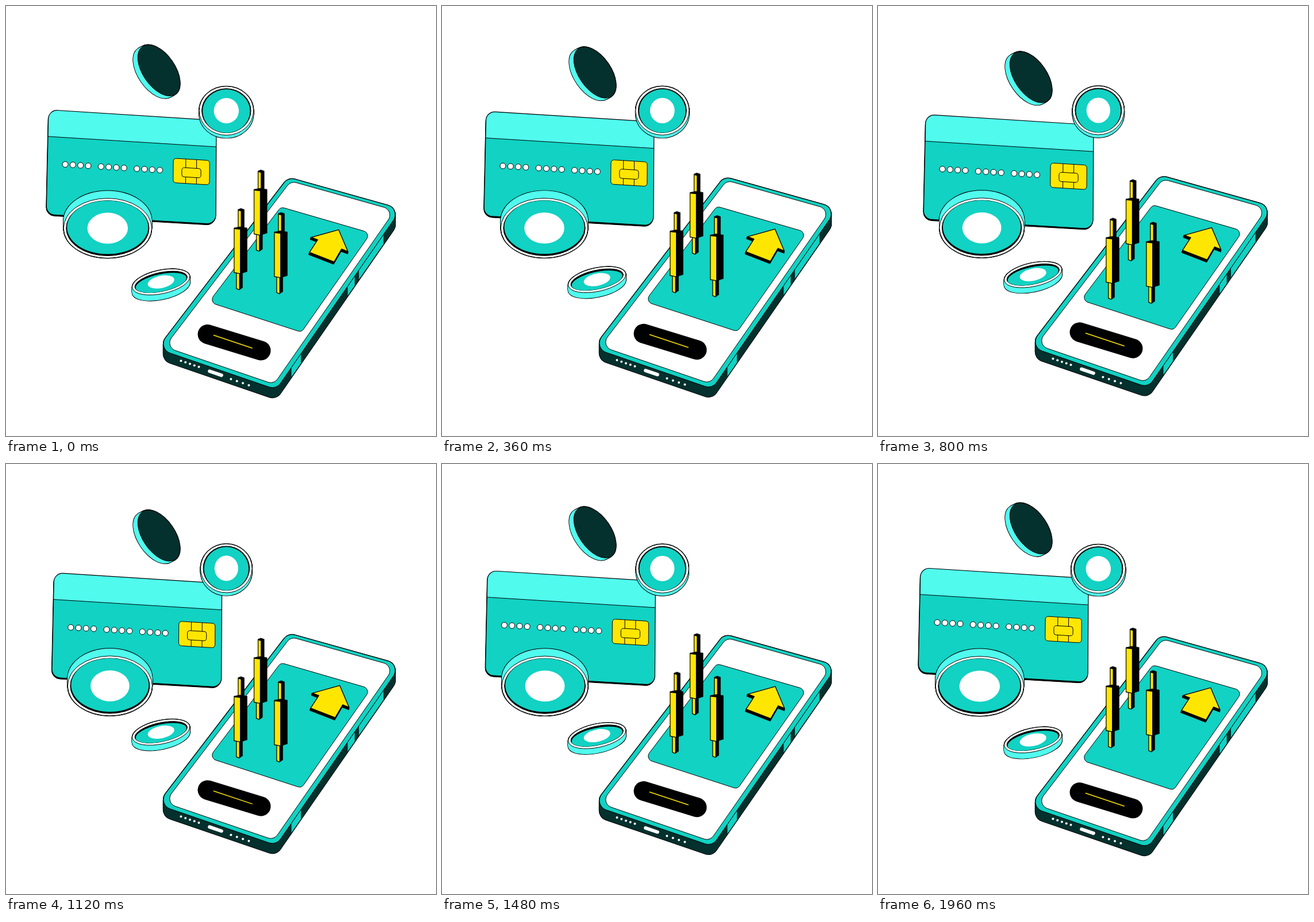
Write an HTML page with a canvas that moves like this. It is 748 px wide and 748 px high and loops after 2 s.

```html
<!DOCTYPE html>
<html lang="en">
<head>
<meta charset="utf-8">
<title>Card, coins and phone</title>
<style>
html, body { margin: 0; width: 100%; height: 100%; overflow: hidden; background: #fff; }
canvas { display: block; }
</style>
</head>
<body>
<canvas id="stage" width="748" height="748"></canvas>
<script>
const c = document.getElementById('stage').getContext('2d');
const TEAL = '#11d2c3', CYAN = '#50fbee', DARK = '#04302d', YELLOW = '#ffe600', BLACK = '#000', WHITE = '#fff';
const LOOP = 2000, STEP = 40;

const mix = (a, b, k) => a + (b - a) * k;
const between = (p, q, k) => [mix(p[0], q[0], k), mix(p[1], q[1], k)];

// Maps the unit square onto a tilted surface given by its four corners.
const surface = (tl, tr, br, bl) => (u, v) => between(between(tl, tr, u), between(bl, br, u), v);
const area = (at, u0, v0, u1, v1) => [at(u0, v0), at(u1, v0), at(u1, v1), at(u0, v1)];

const cardAt = surface([74, 180.5], [366, 199], [365, 379.5], [70, 362.5]);
const phoneAt = surface([491, 298], [687.5, 353], [470, 667], [263, 596]);

function paint(fill, line = 1) {
  if (fill) { c.fillStyle = fill; c.fill(); }
  if (line) { c.strokeStyle = BLACK; c.lineWidth = line; c.stroke(); }
}

function shape(pts, radius, fill, line) {
  const n = pts.length;
  c.beginPath();
  c.moveTo(...between(pts[n - 1], pts[0], 0.5));
  pts.forEach((p, i) => c.arcTo(...p, ...pts[(i + 1) % n], radius));
  c.closePath();
  paint(fill, line);
}

function oval(x, y, rx, ry, turn, fill, line) {
  c.beginPath();
  c.ellipse(x, y, rx, ry, turn * Math.PI / 180, 0, 2 * Math.PI);
  paint(fill, line);
}

const dot = ([x, y], r, line) => oval(x, y, r, r, 0, WHITE, line);

function stroke(from, to, width = 1, color = BLACK) {
  c.beginPath();
  c.moveTo(...from);
  c.lineTo(...to);
  c.strokeStyle = color;
  c.lineWidth = width;
  c.stroke();
}

function shifted(dx, dy, draw) {
  c.save();
  c.translate(dx, dy);
  draw();
  c.restore();
}

// Sweeps a shape along (dx, dy): outline first, then the side colour.
function extrude(dx, dy, fill, draw) {
  const n = Math.ceil(Math.hypot(dx, dy)) * 2;
  for (const line of [1.8, 0])
    for (let i = 0; i <= n; i++)
      shifted(dx * i / n, dy * i / n, () => draw(fill, line));
}

function coin(x, y, rx, ry, turn, depth, shade) {
  extrude(0, depth, CYAN, (f, l) => oval(x, y, rx, ry, turn, f, l));
  oval(x, y, rx, ry, turn, WHITE);
  oval(x, y, rx - 4.5, ry - 4, turn, BLACK);
  oval(x, y + shade, rx - 6, ry - 4 - Math.abs(shade), turn, TEAL, 0);
  oval(x, y, rx * 0.46, ry * 0.52, turn, WHITE, 0);
}

function darkCoin() {
  const face = (f, l) => oval(266, 112, 50.5, 28, 55.5, f, l);
  extrude(-8, 4, CYAN, face);
  face(DARK);
}

function card() {
  const edge = area(cardAt, 0, 0, 1, 1);
  shifted(-0.5, 2, () => shape(edge, 15, BLACK));
  shape(edge, 15, TEAL, 0);
  c.save();
  c.clip();
  shape(area(cardAt, -0.1, -0.1, 1.1, 0.255), 0, CYAN);
  c.restore();
  shape(edge, 15, null, 1.2);

  for (let i = 0; i < 12; i++)
    dot(cardAt(0.106 + i * 0.0453 + Math.floor(i / 4) * 0.031, 0.512), 5);

  shape(area(cardAt, 0.746, 0.39, 0.961, 0.625), 5, YELLOW);
  for (const u of [0.82, 0.884]) stroke(cardAt(u, 0.39), cardAt(u, 0.625));
  shape(area(cardAt, 0.797, 0.474, 0.91, 0.563), 4, YELLOW);
}

function phone() {
  const body = (f, l) => shape(area(phoneAt, 0, 0, 1, 1), 17, f, l);
  const below = (u, v, drop) => between(phoneAt(u, v), [0, 0], 0).map((n, i) => n + i * drop);
  extrude(0, 17.5, DARK, body);

  // Lit bands on the right wall.
  for (const [a, b] of [[0.14, 0.34], [0.37, 0.43], [0.8, 0.88]])
    shape([phoneAt(1, a), below(1, a, 17), below(1, b, 17), phoneAt(1, b)], 0, TEAL, 0.6);

  // Speaker holes and charging slot.
  for (let i = 0; i < 5; i++) dot(below(0.2 + i * 0.0375, 1, 7), 2, 0);
  for (let i = 0; i < 4; i++) dot(below(0.62 + i * 0.05, 1, 9), 2, 0);
  c.lineCap = 'round';
  stroke(below(0.44, 1, 8), below(0.54, 1, 8), 6, WHITE);

  body(TEAL);
  shape(area(phoneAt, 0.04, 0.015, 0.96, 0.98), 14, WHITE);
  shape(area(phoneAt, 0.11, 0.152, 0.9, 0.704), 9, TEAL);
  stroke(phoneAt(0.265, 0.855), phoneAt(0.71, 0.848), 34);
  c.lineCap = 'butt';
  stroke(phoneAt(0.31, 0.85), phoneAt(0.64, 0.85), 1.5, YELLOW);
}

function arrow() {
  const half = [[1, 0], [0.47, 1], [0.47, 0.66], [0, 0.68]];
  const mirror = half.slice(1).reverse().map(([along, side]) => [along, -side]);
  const pts = [...half, ...mirror].map(([along, side]) =>
    [549.5 + 29 * along + 31 * side, 436.5 - 47 * along + 12 * side]);
  extrude(-1, 4, BLACK, (f, l) => shape(pts, 0, f, l));
  shape(pts, 0, YELLOW, 0.8);
}

// Square post: lit left face, dark right face.
function post(x, w, top, end) {
  const l = x - w / 2, r = x + w / 2, m = x - w * 0.04;
  shape([[l, top + 2], [m, top], [r, top + 2], [r, end - 4], [m, end], [l, end - 2]], 0, BLACK, 0.5);
  shape([[l + 1, top + 4], [m, top + 5], [m, end - 1], [l + 1, end - 3]], 0, YELLOW, 0);
}

function candle(x, y) {
  post(x - 2, 11, y + 108, y + 142);
  post(x + 1, 11, y, y + 38);
  post(x, 23, y + 32, y + 114);
}

function draw(t) {
  const p = (1 - Math.cos(2 * Math.PI * t / LOOP)) / 2;
  c.fillStyle = WHITE;
  c.fillRect(0, 0, 748, 748);
  shifted(0, -4 * p, phone);
  shifted(2 * p, -4 * p, arrow);
  shifted(0, 18.5 * p, () => {
    candle(442.7, 285);
    candle(408, 352);
    candle(478, 359);
  });
  shifted(10 * p, 9 * p, card);
  shifted(0, 13 * p, darkCoin);
  coin(383.3, 182.2 - 0.8 * p, 47.2 - 2.5 * p, 42.5, 0, 5, 0.7);
  coin(176.8 + 4.2 * p, 386.5 - 0.6 * p, 76.6 - 3.2 * p, 52, 0, -13, -1.5);
  coin(269.7, 480 - 14 * p, 51, 20.5, -12, 10 - 0.7 * p, 1.5);
}

const start = performance.now();
function tick() {
  const t = (performance.now() - start) % LOOP;
  draw(Math.floor(t / STEP) * STEP);
  requestAnimationFrame(tick);
}
tick();
</script>
</body>
</html>
```
